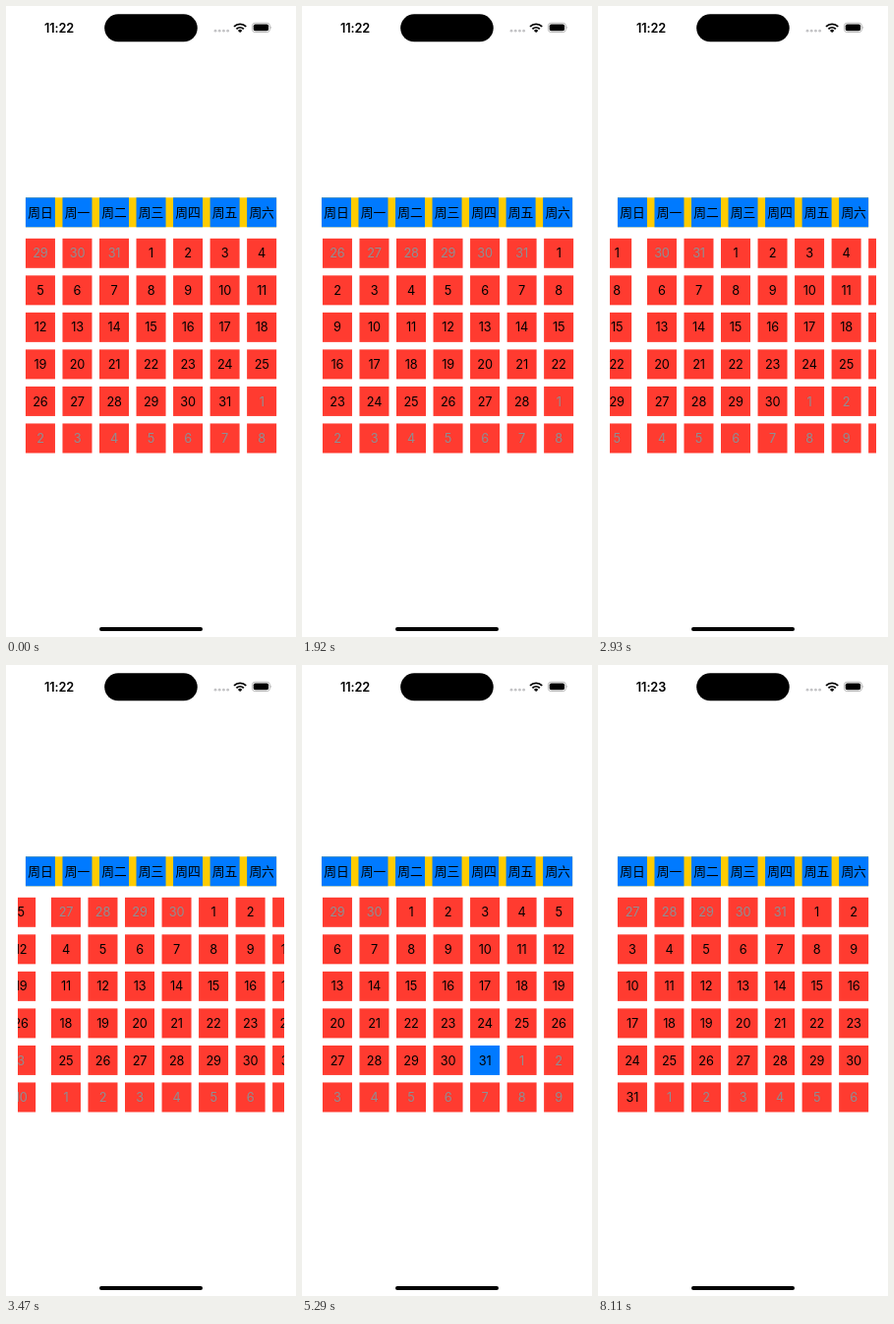
An HTML page for the animation above (9.37 s loop, 295x640 px).

```html
<!DOCTYPE html>
<html lang="zh">
<head>
<meta charset="utf-8">
<title>Calendar paging</title>
<style>
  html, body { margin: 0; width: 100%; height: 100%; overflow: hidden; background: #fff; }
  svg { display: block; width: 100vw; height: 100vh; }
  text { text-anchor: middle; font: 12.75px Inter, "Noto Sans CJK SC", "Noto Sans CJK", sans-serif; }
  .day { letter-spacing: -0.2px; }
  .week { font-family: "Noto Sans CJK SC", "Noto Sans CJK", sans-serif; }
  #clock { font-weight: 600; letter-spacing: -0.1px; }
</style>
</head>
<body>
<svg id="stage" viewBox="0 0 295 640">
  <clipPath id="view"><rect x="12" y="230" width="271" height="230"/></clipPath>
  <rect width="295" height="640" fill="#fff"/>

  <text id="clock" x="54" y="26.6">11:22</text>
  <rect x="100.2" y="8.3" width="94.5" height="28" rx="14"/>
  <g fill="#c4c4c6">
    <circle cx="213" cy="25.2" r="1.4"/><circle cx="217.2" cy="25.2" r="1.4"/>
    <circle cx="221.4" cy="25.2" r="1.4"/><circle cx="225.6" cy="25.2" r="1.4"/>
  </g>
  <g fill="none" stroke="#000" stroke-width="1.9">
    <path d="M232 20.9A8.7 8.7 0 0 1 244.2 20.9"/>
    <path d="M234.4 23.4A5.3 5.3 0 0 1 241.8 23.4"/>
  </g>
  <path d="M238.1 27L235.9 24.9A3.2 3.2 0 0 1 240.3 24.9Z"/>
  <rect x="250.4" y="17.2" width="18" height="9.4" rx="3" fill="none" stroke="#a6a6a6" stroke-width=".8"/>
  <rect x="251.7" y="18.5" width="15.4" height="6.8" rx="1.8"/>
  <path d="M269.5 20.3Q271 21.9 269.5 23.5Z" fill="#a6a6a6"/>

  <g id="header"></g>
  <g clip-path="url(#view)"><g id="strip"></g></g>
  <rect x="95" y="630" width="105" height="4" rx="2"/>
</svg>
<script>
const LOOP = 9370, CLOCK_TICK = 8110;
const LEFT = 19.95, TOP = 235.8, PITCH = 37.53, SIZE = 30, PAGE = 271;
const YEAR = 2025, MONTHS = 8;
const RED = "#ff3b30", BLUE = "#007aff", YELLOW = "#ffcc00", GRAY = "#8e8e93";

const $ = id => document.getElementById(id);

function add(parent, tag, attrs, label) {
  const el = document.createElementNS("http://www.w3.org/2000/svg", tag);
  for (const key in attrs) el.setAttribute(key, attrs[key]);
  if (label !== undefined) el.textContent = label;
  parent.appendChild(el);
}

function cell(parent, x, y, fill, label, cls, color) {
  add(parent, "rect", { x, y, width: SIZE, height: SIZE, fill });
  add(parent, "text", { x: x + SIZE / 2, y: y + 19.6, class: cls, fill: color }, label);
}

function buildHeader() {
  add($("header"), "rect", { x: LEFT, y: 194.3, width: 6 * PITCH + SIZE, height: SIZE, fill: YELLOW });
  [..."日一二三四五六"].forEach((d, i) =>
    cell($("header"), LEFT + i * PITCH, 194.3, BLUE, "周" + d, "week", "#000"));
}

function buildMonth(month) {
  const lead = new Date(YEAR, month, 1).getDay();
  for (let i = 0; i < 42; i++) {
    const date = new Date(YEAR, month, 1 - lead + i);
    const inside = date.getMonth() === month;
    const today = inside && month === 6 && date.getDate() === 31;
    cell($("strip"), LEFT + month * PAGE + (i % 7) * PITCH, TOP + Math.floor(i / 7) * PITCH,
      today ? BLUE : RED, date.getDate(), "day", inside ? "#000" : GRAY);
  }
}

// Each move: page, screen refresh times, page offset in px at each refresh.
const FLICK = [240, 110, 28, 1];
const moves = [
  [0, [0, 1060, 1180], [0, -1, 0]],
  [1, [1580, 1690, 1800, 1920], FLICK],
  [2, [2180, 2290, 2410], [150, 35, 1]],
  [3, [2720, 2830, 2930, 3050], [240, 110, 30, 1]],
  [4, [3250, 3360, 3470, 3580], [240, 110, 26, 1]],
  [5, [3830, 3950, 4060, 4180], FLICK],
  [5, [4340, 4460, 4570], [-8, -2, 0]],
  [6, [4950, 5060, 5170, 5290], FLICK],
  [7, [6840, 6950, 7060, 7170], FLICK],
  [7, [CLOCK_TICK], [0]]
];

function scrollAt(t) {
  const [page, times, offsets] = moves.filter(m => m[1][0] <= t).pop();
  const step = times.filter(s => s <= t).length - 1;
  return offsets[step] - page * PAGE;
}

function draw(t) {
  $("strip").setAttribute("transform", `translate(${scrollAt(t)} 0)`);
  $("clock").textContent = t < CLOCK_TICK ? "11:22" : "11:23";
}

buildHeader();
for (let m = 0; m < MONTHS; m++) buildMonth(m);

const start = performance.now();
function tick() {
  draw((performance.now() - start) % LOOP);
  requestAnimationFrame(tick);
}
tick();
</script>
</body>
</html>
```
